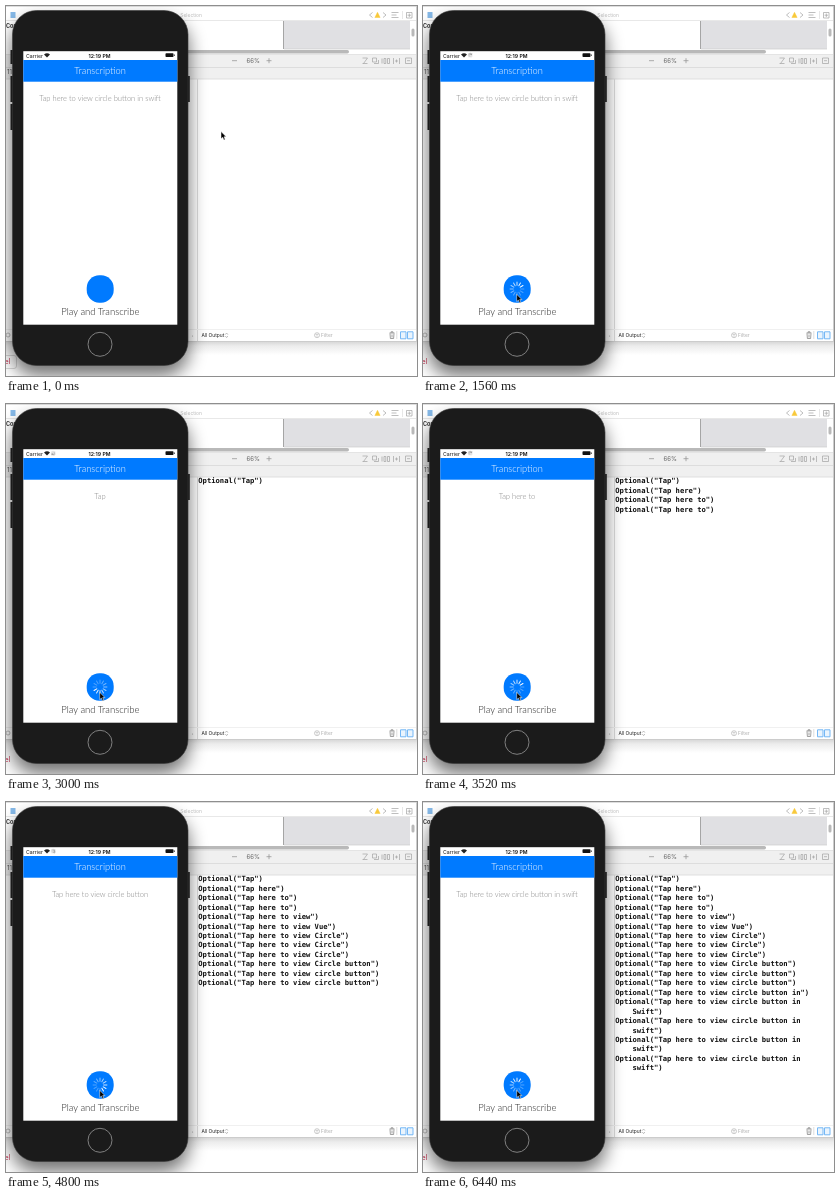
These frames come from a looping animation (411x370 px, 6.48 s). An HTML page:

```html
<!DOCTYPE html>
<html lang="en">
<head>
<meta charset="utf-8">
<title>Transcription</title>
<style>
  html, body { margin: 0; width: 100%; height: 100%; overflow: hidden; background: #fff; }
  svg { display: block; width: 411px; height: 370px; }
  text { font-family: Inter, Roboto, sans-serif; }
  .app { font-family: Lato, "Open Sans", sans-serif; text-anchor: middle; }
  .status { font-size: 5.2px; fill: #111; }
  .code { font: bold 7.16px "DejaVu Sans Mono", monospace; fill: #111; white-space: pre; }
  .icon { fill: none; stroke: #a2a2a2; stroke-width: .7; }
</style>
</head>
<body>
<svg viewBox="0 0 411 370">
  <defs>
    <linearGradient id="fall" x2="0" y2="1">
      <stop stop-color="#d4d4d4"/><stop offset=".35" stop-color="#ececec"/><stop offset="1" stop-color="#fff"/>
    </linearGradient>
    <filter id="blur" x="-30%" y="-20%" width="160%" height="140%"><feGaussianBlur stdDeviation="9"/></filter>
  </defs>

  <!-- editor window -->
  <rect width="411" height="370" fill="#fff"/>
  <rect y="335" width="411" height="14" fill="url(#fall)"/>
  <rect width="410" height="335" fill="#fff"/>
  <path d="M410.5 0V335M0 335.5H411" stroke="#ccc"/>
  <rect width="410" height="1" fill="#dedede"/>
  <path d="M0 14.5H410" stroke="#e8e8e8"/>
  <rect x="4.500" y="6" width="5" height="6" fill="#86b9e8"/>
  <text x="166" y="11.300" font-size="5" fill="#bbb">No Selection</text>
  <text x="0" y="22" font-size="5.500" font-weight="700" fill="#333">Con</text>
  <g class="icon">
    <path d="M366.500 6.500l-3 2.500 3 2.500M377 6.500l3 2.500-3 2.500M385.500 6.500h7M385.500 9h5M385.500 11.500h7"/>
    <path d="M396.500 5v8" stroke="#ddd"/>
    <path d="M400.500 6.500h5.500v5.500h-5.500zM403.300 7.500v3.500M401.500 9.200h3.500"/>
  </g>
  <path d="M371.500 6.300l2.600 5.200h-5.200z" fill="#f8c93a" stroke="#f8c93a" stroke-width=".5" stroke-linejoin="round"/>
  <rect x="277.500" y="15" width="126.500" height="28" fill="#e0e0e3"/>
  <path d="M277.500 15V43" stroke="#a5a5a5"/>
  <path d="M278 43H404" stroke="#ccc" stroke-width=".7"/>
  <rect x="405.500" y="22.500" width="3" height="8" rx="1.500" fill="#b9b9b9"/>
  <rect x="150" y="44" width="193" height="3.500" rx="1.700" fill="#b9b9b9"/>
  <rect y="48" width="410" height="25" fill="#f0f0f0"/>
  <path d="M0 48.500H410" stroke="#e4e4e4"/>
  <g font-size="6" fill="#666">
    <text x="240.500" y="57">66%</text>
    <path d="M226 54.700h5M260.500 54.700h5M263 52.200v5" stroke="#999" stroke-width=".8"/>
  </g>
  <g class="icon">
    <path d="M356.500 52h5M356.500 57.500h5M361.500 52l-4 5.500M366.500 52h4v4h-4zM368 57.500h4.500v-3.500"/>
    <path d="M376 52.500v5M378 52.500h1.800v5H378zM381.500 52.500h2v5h-2zM387.500 52v6M393.500 52v6M389 55h3M390.500 53.500v3"/>
    <path d="M399.500 52h6v5.500h-6zM401 54.700h3"/>
  </g>
  <path d="M0 61.500H410M0 73H410" stroke="#d8d8d8" stroke-width=".8"/>
  <path d="M191.500 73V335" stroke="#dcdcdc"/>
  <text x="1" y="68" font-size="6" fill="#555">11</text>
  <path d="M0 323.500H410" stroke="#f0f0f0"/>
  <text x="195.500" y="331.300" font-size="4.900" fill="#222">All Output</text>
  <path d="M219.300 328.600l1.300-1.600 1.300 1.600M219.300 330l1.300 1.600 1.300-1.600" class="icon"/>
  <g stroke="#aaa" stroke-width=".6" fill="none">
    <circle cx="311" cy="329.200" r="2.500"/><path d="M309.600 328.400h2.800M310.200 330h1.600"/>
  </g>
  <text x="315" y="331.300" font-size="4.900" fill="#aaa">Filter</text>
  <path d="M383.500 327h5M385 326.800v-1h2v1M384 327.500l.4 5h3.200l.4-5M386 328.500v3" class="icon" style="stroke:#777"/>
  <path d="M390.800 325v8" stroke="#ddd"/>
  <path d="M394.500 325.800h5.500v7h-5.500zM401.500 325.800h5.500v7h-5.500z" fill="#eaf4fd" stroke="#74b7f5"/>
  <circle cx="2" cy="329" r="2" class="icon"/>
  <circle cx="186.500" cy="330" r=".6" fill="#aaa"/>
  <text x="-1.500" y="358" font-size="7" fill="#c2304f">el</text>
  <path id="edge" d="M0 349.500h8q2.500 0 2.500 2.500v8q0 2.500-2.500 2.500H0" fill="none" stroke="#d0d0d0" stroke-width=".8"/>

  <!-- phone -->
  <rect x="5" y="14" width="178" height="356" rx="26" opacity=".55" filter="url(#blur)"/>
  <g id="log"></g>
  <path d="M4.500 44H8V58H4.500zM4.500 70H8V96H4.500zM4.500 98H8V124H4.500zM180 70h3.800v26H180z" fill="#1b1b1b"/>
  <rect x="6.500" y="4.500" width="175.500" height="355" rx="24" fill="#1b1b1b" stroke="#3a3a3a" stroke-width=".6"/>
  <circle cx="94" cy="338.300" r="12" fill="#1b1b1b" stroke="#808080"/>
  <rect x="17.300" y="45.200" width="154" height="273.500" fill="#fff"/>
  <rect x="17.300" y="54" width="154" height="21.700" fill="#007aff"/>
  <text class="status" x="20" y="51.500">Carrier</text>
  <path d="M41 51.600L38 48.600q3-2.600 6 0Z" fill="#222"/>
  <text class="status" x="93.500" y="51.500" font-weight="600" text-anchor="middle">12:19 PM</text>
  <rect x="159.500" y="47.300" width="8" height="3.800" rx=".8" fill="#111"/>
  <rect x="168" y="48.500" width=".7" height="1.400" fill="#111"/>
  <text class="app" x="94" y="68" font-size="9.300" font-weight="300" fill="#fff">Transcription</text>
  <text id="label" class="app" x="94" y="95" font-size="7.550" font-weight="300" fill="#858585"></text>
  <rect x="80.700" y="269.300" width="27" height="27.400" rx="12.600" fill="#007aff"/>
  <text class="app" x="94.300" y="309" font-size="9.500" font-weight="300" fill="#222">Play and Transcribe</text>
  <g id="spinner"></g>
  <g id="network"></g>

  <path id="cursor" d="M0 0V7.300L1.700 5.800 2.900 8.600 4.200 8 3 5.300H5.200Z" fill="#000" stroke="#fff" stroke-width=".5"/>
</svg>
<script>
  const LOOP = 6480, CLICK = 1320, NET_END = 5920, ROW = 9.45;
  const NS = "http://www.w3.org/2000/svg";
  const $ = id => document.getElementById(id);
  const add = (parent, tag, attrs, text = "") => {
    const el = document.createElementNS(NS, tag);
    for (const k in attrs) el.setAttribute(k, attrs[k]);
    el.textContent = text;
    parent.appendChild(el);
    return el;
  };

  // [time, recognised phrase]
  const results = [
    [2920, "Tap"], [3080, "Tap here"], [3240, "Tap here to"], [3400, "Tap here to"],
    [3680, "Tap here to view"], [3880, "Tap here to view Vue"],
    [4040, "Tap here to view Circle"], [4200, "Tap here to view Circle"],
    [4400, "Tap here to view Circle"], [4560, "Tap here to view Circle button"],
    [4680, "Tap here to view circle button"], [4800, "Tap here to view circle button"],
    [4960, "Tap here to view circle button in"],
    [5200, "Tap here to view circle button in Swift"],
    [5600, "Tap here to view circle button in swift"],
    [5760, "Tap here to view circle button in swift"],
    [5920, "Tap here to view circle button in swift"]
  ];
  const idleText = results[results.length - 1][1];

  let row = 0;
  const entries = results.map(([, phrase]) => {
    const g = add($("log"), "g", {});
    const line = (x, s) => add(g, "text", { class: "code", x, y: 79.3 + ROW * row++ }, s);
    const full = `Optional("${phrase}")`;
    const cut = full.search(/swift"\)$/i);
    if (cut < 0) line(192.3, full);
    else {
      line(192.3, full.slice(0, cut - 1));
      line(209.5, full.slice(cut));
    }
    return g;
  });

  // Twelve fading spokes; the brightest one leads clockwise.
  const spokes = (id, cx, cy, inner, outer, width, color) =>
    Array.from({ length: 12 }, (_, i) => add($(id), "path", {
      d: `M0 ${-inner}V${-outer}`, stroke: color, "stroke-width": width, "stroke-linecap": "round",
      transform: `translate(${cx} ${cy}) rotate(${i * 30})`
    }));
  const big = spokes("spinner", 94, 283, 3.7, 6.9, 1, "#fff");
  const small = spokes("network", 47.2, 49.2, 1.1, 2, 0.45, "#444");
  const spin = (set, step) => set.forEach((s, i) => {
    const age = (((step - i) % 12) + 12) % 12;
    s.setAttribute("opacity", Math.max(0.3, 1 - age / 11));
  });

  const path = [[40, 215, 125.5], [360, 164, 215], [640, 101, 305], [760, 97, 303], [1040, 93.7, 288.3]];
  const cursorAt = t => {
    if (t <= path[0][0]) return path[0].slice(1);
    const n = path.findIndex(p => p[0] > t);
    if (n < 0) return path[path.length - 1].slice(1);
    const a = path[n - 1], b = path[n];
    let k = (t - a[0]) / (b[0] - a[0]);
    k = n === 1 ? k * k * (2 - k) : k * (2 - k);
    return [a[1] + (b[1] - a[1]) * k, a[2] + (b[2] - a[2]) * k];
  };

  const show = (el, on) => el.setAttribute("visibility", on ? "visible" : "hidden");

  function draw() {
    const t = performance.now() % LOOP;
    const busy = t >= CLICK;
    const step = Math.floor((t - CLICK) * 12 / 1000);
    const count = results.filter(r => r[0] <= t).length;

    $("cursor").setAttribute("transform", `translate(${cursorAt(t)})`);
    $("label").textContent = count ? results[count - 1][1] : idleText;
    entries.forEach((e, i) => show(e, i < count));
    show($("edge"), !busy);
    show($("spinner"), busy);
    show($("network"), busy && t < NET_END);
    spin(big, step);
    spin(small, step);
    requestAnimationFrame(draw);
  }
  draw();
</script>
</body>
</html>
```
